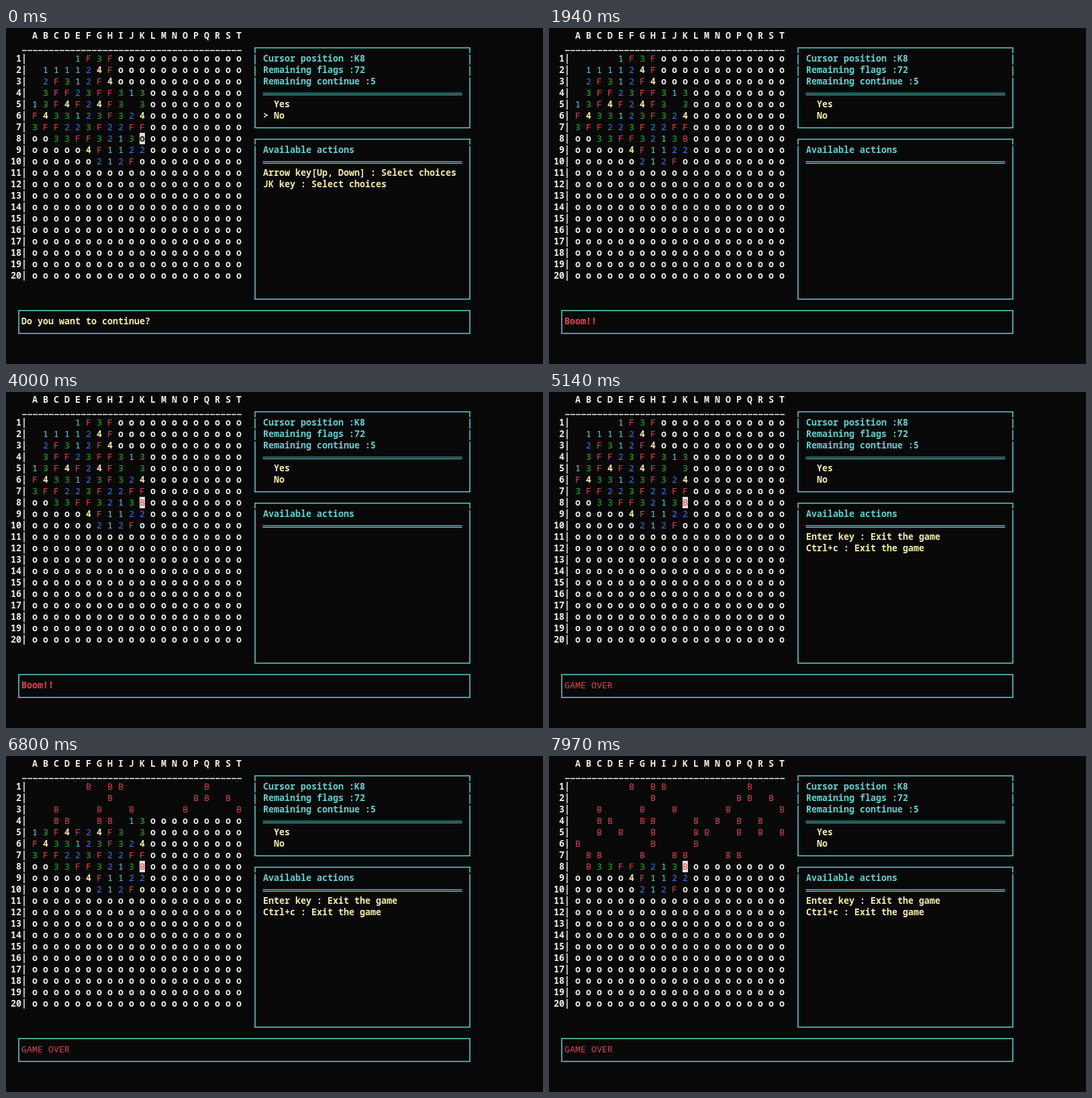
An HTML page for the animation above (8 s loop, 800x500 px).

```html
<!DOCTYPE html>
<html lang="en">
<head>
<meta charset="utf-8">
<title>Terminal minesweeper</title>
<style>
  html, body { margin: 0; width: 100%; height: 100%; overflow: hidden; background: #080808; }
  svg { display: block; width: 800px; height: 500px; }
  text { font: 600 13.333px "Noto Sans Mono", "DejaVu Sans Mono", monospace; white-space: pre; }
  .cell { text-anchor: middle; }
  .plain { font-weight: 500; }
</style>
</head>
<body>
<svg id="stage" viewBox="0 0 800 500"></svg>
<script>
const LOOP = 8000;
const COL = 8, ROW = 17, SIZE = 20;
const BACK = '#080808', WHITE = '#eeeeea', YELLOW = '#f4eca4', CYAN = '#61d0d0', RED = '#dc4450';
const COLORS = { 1: CYAN, 2: '#3b74ee', 3: '#1cbc14', 4: YELLOW, F: RED, B: RED, o: WHITE };

const BOARD = [
  '    1F3F', ' 111124F', ' 2F312F4', ' 3FF23FF313', '13F4F24F3 3',
  'F433123F324', '3FF223F22FF', 'oo33FF3213o', 'ooooo4F1122', 'oooooo212F'
];
// Columns holding a bomb, one string per row
const BOMBS = ['FHIQ', 'HPQS', 'CGJOT', 'CDGHLNPR', 'CEHLMPRT', 'AHL', 'BCGJKOP', 'B'];
const CURSOR = { row: 7, col: 10 };

// Times counted in ticks of 1/30 s
const BOOM = 1, GAME_OVER = 148;
const BLINKS = [25, 41, 57, 73, 88, 120];
const REVEAL_START = 5702, REVEAL_STEP = 15.87;

const stage = document.getElementById('stage');

function add(tag, attrs, content = '') {
  const el = document.createElementNS('http://www.w3.org/2000/svg', tag);
  for (const key in attrs) el.setAttribute(key, attrs[key]);
  el.textContent = content;
  stage.append(el);
  return el;
}
const baseline = row => 16.2 + ROW * row;
const write = (col, row, fill, content) =>
  add('text', { x: COL * col - 1, y: baseline(row), fill }, content);
const center = (x, row, fill, content) =>
  add('text', { x, y: baseline(row), fill, class: 'cell' }, content);
const line = (d, stroke, width = 1.5, dash = 'none') =>
  add('path', { d, stroke, fill: 'none', 'stroke-width': width, 'stroke-dasharray': dash });
const letter = col => String.fromCharCode(65 + col);
const cellX = col => 43 + 16 * col;

// The sides break where the first rows of the box meet
function box(left, top, bottom, gaps) {
  line(`M${left} ${top}H691V${bottom}H${left}Z`, CYAN);
  for (let i = 0; i < gaps; i++)
    for (const x of [left, 691])
      add('rect', { x: x - 2, y: top + 8 + ROW * i, width: 4, height: 2, fill: BACK });
}
const rule = y => [y, y + 2.5].forEach(v => line(`M382.5 ${v}H679.5`, CYAN, 1.2));

line('M24 33.5H351', WHITE, 1.3, '7 1');
line('M27 38.5V376', WHITE, 1.5, '15 2');
box(371, 29.5, 148.5, 3);
box(371, 165.5, 403.5, 1);
box(19, 420.5, 454.5, 0);
rule(97);
rule(198.8);

write(48, 2, CYAN, 'Cursor position :K8');
write(48, 3, CYAN, 'Remaining flags :72');
write(48, 4, CYAN, 'Remaining continue :5');
write(50, 6, YELLOW, 'Yes');
write(50, 7, YELLOW, 'No');
write(48, 10, CYAN, 'Available actions');
const pointer = write(48, 7, YELLOW, '>');
const actions = [12, 13].map(row => write(48, row, YELLOW, ''));
const message = write(3, 25, YELLOW, '');
const cursor = add('rect', { x: 199, y: 156, width: 8, height: 17, fill: '#e2e0da' });

const cells = [];
for (let row = 0; row < SIZE; row++) {
  center(cellX(row), 0, WHITE, letter(row));
  write(row < 9 ? 2 : 1, row + 2, WHITE, row + 1);
  for (let col = 0; col < SIZE; col++) cells.push(center(cellX(col), row + 2, WHITE, ''));
}

function symbolAt(index, revealed, boomed) {
  const row = Math.floor(index / SIZE), col = index % SIZE;
  if (index < revealed) return BOMBS[row]?.includes(letter(col)) ? 'B' : '';
  if (boomed && row === CURSOR.row && col === CURSOR.col) return 'B';
  return (BOARD[row] || '').padEnd(SIZE, 'o')[col];
}

function render(tick) {
  const boomed = tick >= BOOM, over = tick >= GAME_OVER;
  const revealed = Math.max(0, Math.floor((tick * 100 / 3 - REVEAL_START) / REVEAL_STEP));
  const cursorOn = BLINKS.filter(t => t <= tick).length % 2 === 0;

  cells.forEach((cell, i) => {
    const symbol = symbolAt(i, revealed, boomed);
    cell.textContent = symbol;
    cell.setAttribute('fill', COLORS[symbol] || WHITE);
    cell.classList.toggle('plain', 'FB123'.includes(symbol));
  });
  cursor.setAttribute('visibility', cursorOn ? 'visible' : 'hidden');
  if (!boomed) cells[CURSOR.row * SIZE + CURSOR.col].setAttribute('fill', '#141414');

  pointer.textContent = boomed ? '' : '>';
  message.textContent = over ? 'GAME OVER' : boomed ? 'Boom!!' : 'Do you want to continue?';
  message.setAttribute('fill', boomed ? RED : YELLOW);
  message.classList.toggle('plain', over);
  const lines = over ? ['Enter key : Exit the game', 'Ctrl+c : Exit the game']
    : boomed ? ['', '']
    : ['Arrow key[Up, Down] : Select choices', 'JK key : Select choices'];
  actions.forEach((el, i) => { el.textContent = lines[i]; });
}

const start = performance.now();
let shown = -1;
function frame() {
  const time = (performance.now() - start) % LOOP;
  const tick = Math.floor(Math.floor(time / 10) * 3 / 10);
  if (tick !== shown) render(shown = tick);
  requestAnimationFrame(frame);
}
frame();
</script>
</body>
</html>
```
